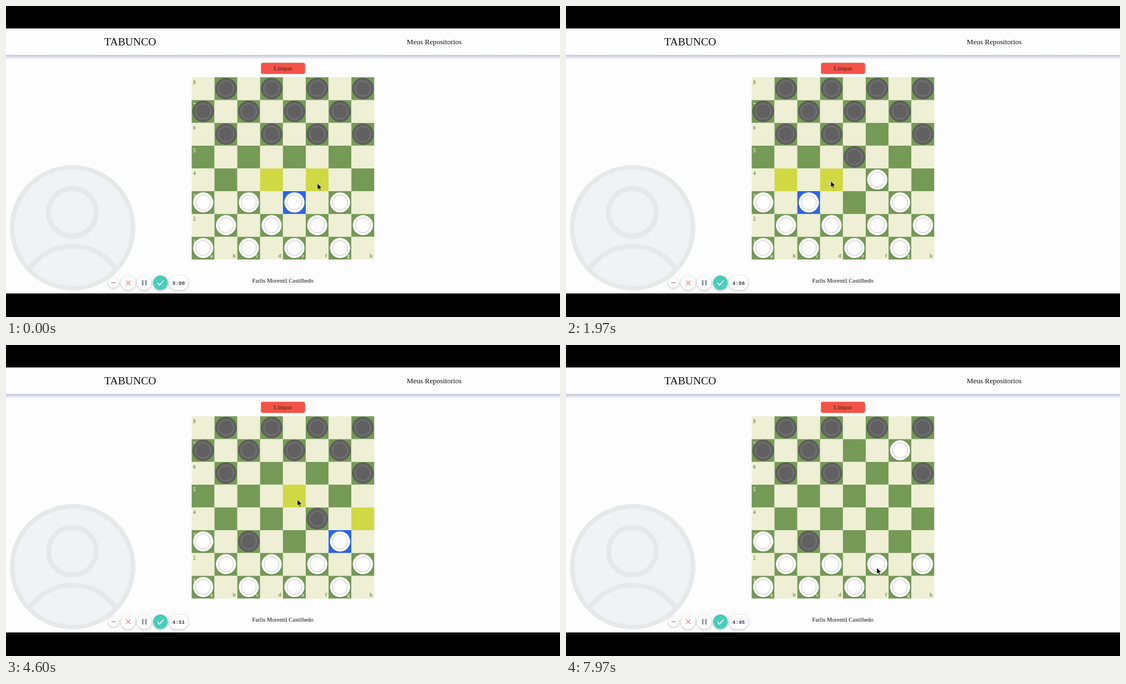
Write an HTML page that moves like this. It is 998 px wide and 561 px high and loops after 8000 ms.

```html
<!DOCTYPE html>
<html lang="pt">
<head>
<meta charset="utf-8">
<title>Damas</title>
<style>
  html, body { margin: 0; width: 100%; height: 100%; overflow: hidden; background: #000; }
  svg { display: block; width: 100%; height: 100%; }
  text { font-family: "Liberation Serif", serif; fill: #111; }
  .label { font-size: 9.5px; font-weight: bold; }
  #timer { font: bold 9.3px "Liberation Mono", monospace; fill: #3c4258; }
  .controls { filter: drop-shadow(0 1px 2px #0004); }
</style>
</head>
<body>
<svg viewBox="0 0 998 561">
  <defs>
    <linearGradient id="shade" x2="0" y2="1">
      <stop stop-color="#b4b7d2"/>
      <stop offset=".25" stop-color="#d2d4e2"/>
      <stop offset="1" stop-color="#fdfdfd"/>
    </linearGradient>
    <clipPath id="face"><circle cx="120" cy="400" r="109"/></clipPath>
    <g id="w">
      <circle cy=".8" r="19" fill="#4a6a35" opacity=".45"/>
      <circle r="18.2" fill="#fefefe"/>
      <circle r="13.5" fill="none" stroke="#c9c2c6"/>
    </g>
    <g id="b">
      <circle r="19.2" fill="#555653"/>
      <circle r="17.6" fill="#646464"/>
      <circle r="13.4" fill="#606060" stroke="#99959a" stroke-dasharray="1.6 .8"/>
    </g>
  </defs>

  <rect y="40.5" width="998" height="478" fill="#fdfdfd"/>
  <rect y="88.5" width="998" height="8" fill="url(#shade)"/>
  <text x="177" y="70.5" font-size="19.7">TABUNCO</text>
  <text x="722" y="69" font-size="13.15">Meus Repositorios</text>
  <rect x="459.5" y="102.7" width="79" height="19.6" rx="3" fill="#f45246" stroke="#d8705a" stroke-width=".7"/>
  <text x="499" y="116" font-size="11.4" text-anchor="middle" style="fill:#3a2020">Limpar</text>
  <text x="498.8" y="498.7" font-size="10.47" text-anchor="middle">Farlis Morentil Castilhedo</text>

  <circle cx="120" cy="400" r="109" fill="#f1f2f3"/>
  <g fill="none" stroke="#e6e8ea" stroke-width="9">
    <circle cx="119.5" cy="372" r="43"/>
    <circle cx="120" cy="527" r="94" clip-path="url(#face)"/>
    <circle cx="120" cy="400" r="109" stroke-width="8"/>
  </g>

  <g class="controls" fill="#fff">
    <circle cx="193.5" cy="499.3" r="9"/>
    <circle cx="220" cy="499.3" r="13"/>
    <circle cx="249" cy="499.3" r="13"/>
    <circle cx="278.2" cy="499.3" r="13" fill="#48cdb9"/>
    <rect x="294" y="486.3" width="34" height="26" rx="12"/>
  </g>
  <g fill="none" stroke-width="1.5">
    <path d="M190.3 499.3h1.5m1 0h1.5m1 0h1.5" stroke="#50566a"/>
    <path d="M216 495.2l8 8m0-8l-8 8" stroke="#e98d8d"/>
    <path d="M246.3 494.3v10m5.6-10v10" stroke="#8e95a8" stroke-width="3"/>
    <path d="M273 499.8l3.5 3.6 7-8" stroke="#fff" stroke-width="2"/>
  </g>
  <text id="timer" x="311" y="502.6" text-anchor="middle"></text>

  <g id="board"></g>
  <path id="cursor" d="M0 0V11.2L2.6 8.8 4.4 12.8 6.2 12 4.4 8.2H8Z" stroke="#fff" stroke-width=".6"/>
</svg>
<script>
const LOOP = 8000, SIZE = 41.1, LEFT = 334.5, TOP = 128.5;
const FILES = 'abcdefgh';
const GREEN = '#759a56', CREAM = '#eeefd4', YELLOW = '#d0d843', BLUE = '#2c63f2';
const CLICK_DELAY = 40, DWELL = 80;

// Pointer stops: arrival time, x, y and the square clicked there, if any
const stops = [
  [-100, 561, 320, 'e3'], [120, 561, 320, 'f4'],
  [780, 560, 232, 'f6'], [1270, 538, 284], [1370, 525, 279, 'e5'],
  [1710, 440, 351, 'c3'], [2000, 479, 314, 'd4'],
  [2320, 517, 276, 'e5'], [2570, 478, 314], [2740, 439, 352, 'c3'],
  [3430, 553, 304, 'f4'], [3660, 522, 275, 'e5'],
  [3910, 480, 235, 'd6'], [4150, 558, 312, 'f4'],
  [4370, 600, 350, 'g3'], [4600, 525, 279, 'e5'],
  [5100, 600, 192, 'g7'], [5360, 563, 230, 'f6'],
  [5690, 522, 272, 'e5'], [6000, 582, 228], [6140, 600, 192, 'g7'],
  [6650, 519, 190, 'e7'], [7020, 480, 232, 'd6'],
  [7700, 560, 402]
];

const $ = id => document.getElementById(id);
const square = (f, r) => FILES[f] + (r + 1);
const coords = name => [FILES.indexOf(name[0]), name[1] - 1];

function eachSquare(visit) {
  for (let r = 0; r < 8; r++) for (let f = 0; f < 8; f++) visit(f, r, square(f, r));
}

function startPosition() {
  const pieces = {};
  eachSquare((f, r, name) => {
    if ((f + r) % 2 === 0 && r !== 3 && r !== 4) pieces[name] = r < 3 ? 'w' : 'b';
  });
  return pieces;
}

function targets(pieces, from) {
  if (!from) return [];
  const [f, r] = coords(from), side = pieces[from], step = side === 'w' ? 1 : -1;
  const inside = (x, y) => x >= 0 && x < 8 && y >= 0 && y < 8;
  const found = [];
  for (const dx of [-1, 1]) {
    if (!inside(f + dx, r + step)) continue;
    const near = square(f + dx, r + step);
    if (!pieces[near]) found.push(near);
    else if (pieces[near] !== side && inside(f + 2 * dx, r + 2 * step)) {
      const far = square(f + 2 * dx, r + 2 * step);
      if (!pieces[far]) found.push(far);
    }
  }
  return found;
}

function replay(clicks) {
  const pieces = startPosition();
  let selected = null;
  for (const name of clicks) {
    if (pieces[name]) { selected = name; continue; }
    const [f0, r0] = coords(selected), [f1, r1] = coords(name);
    pieces[name] = pieces[selected];
    delete pieces[selected];
    if (Math.abs(f1 - f0) === 2) delete pieces[square((f0 + f1) / 2, (r0 + r1) / 2)];
    selected = null;
  }
  return { pieces, selected };
}

function drawBoard(clicks) {
  const { pieces, selected } = replay(clicks);
  const open = targets(pieces, selected);
  let cells = '', men = '';
  eachSquare((f, r, name) => {
    const x = LEFT + f * SIZE, y = TOP + (7 - r) * SIZE;
    const dark = (f + r) % 2 === 0, ink = dark ? CREAM : GREEN;
    const fill = name === selected ? BLUE : open.includes(name) ? YELLOW : dark ? GREEN : CREAM;
    const label = (text, dx, dy, anchor) =>
      `<text class="label" x="${x + dx}" y="${y + dy}" text-anchor="${anchor}" style="fill:${ink}">${text}</text>`;
    cells += `<rect x="${x}" y="${y}" width="${SIZE}" height="${SIZE}" fill="${fill}"/>`;
    if (f === 0) cells += label(r + 1, 2.5, 12.2, 'start');
    if (r === 0) cells += label(FILES[f], SIZE - 3, 38, 'end');
    if (pieces[name]) men += `<use href="#${pieces[name]}" x="${x + 20.7}" y="${y + 20.4}"/>`;
  });
  $('board').innerHTML = cells + men;
}

function pointerAt(t) {
  const i = stops.findIndex(stop => stop[0] > t);
  if (i < 0) return stops[stops.length - 1].slice(1, 3);
  const [t0, x0, y0, clicked] = stops[i - 1], [t1, x1, y1] = stops[i];
  const start = t0 + (clicked ? DWELL : 0);
  const p = Math.max(0, (t - start) / (t1 - start));
  const e = p * p * (3 - 2 * p);
  return [x0 + (x1 - x0) * e, y0 + (y1 - y0) * e];
}

let drawn = -1;
function render(now) {
  const t = now % LOOP;
  const clicks = stops.filter(s => s[3] && s[0] + CLICK_DELAY <= t).map(s => s[3]);
  if (clicks.length !== drawn) {
    drawBoard(clicks);
    drawn = clicks.length;
  }
  const left = 300 - Math.floor((t + 185) / 525);
  $('timer').textContent = `${Math.floor(left / 60)}:${String(left % 60).padStart(2, '0')}`;
  $('cursor').setAttribute('transform', `translate(${pointerAt(t)})`);
  requestAnimationFrame(render);
}
render(0);
</script>
</body>
</html>
```
